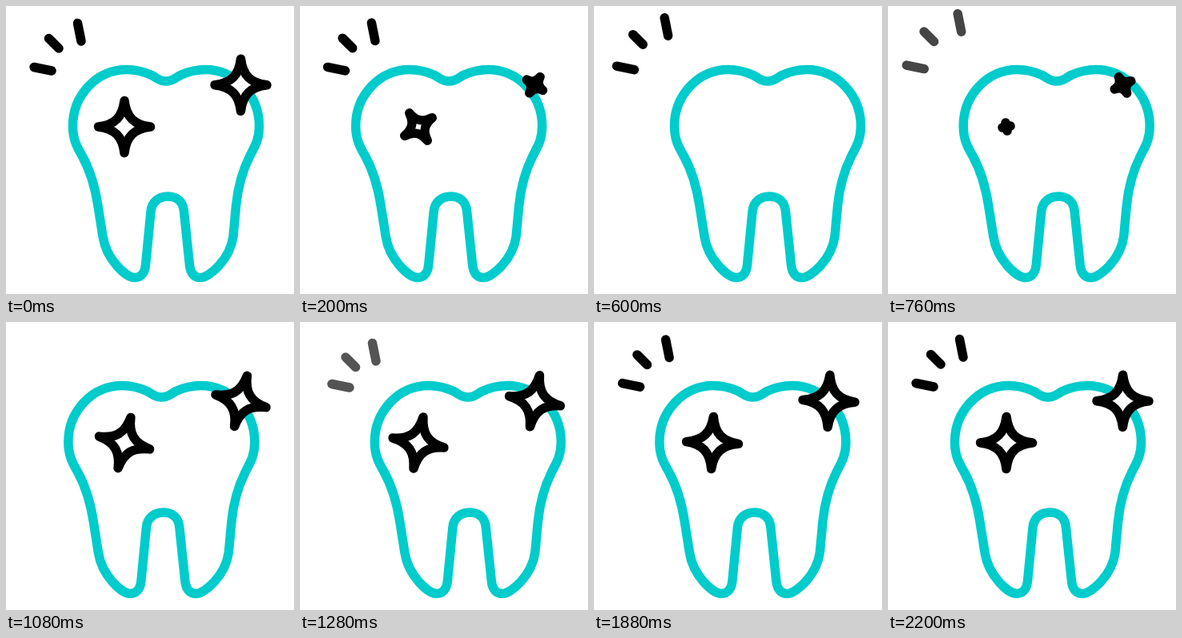
Write an HTML page that moves like this. It is 360x360 px and loops after 2.24 s.

```html
<!DOCTYPE html>
<html lang="en">
<head>
<meta charset="utf-8">
<title>Sparkling tooth</title>
<style>
  html, body { margin: 0; width: 100%; height: 100%; overflow: hidden; background: #fff; }
  svg { display: block; width: 100vw; height: 100vh; }
</style>
</head>
<body>
<svg viewBox="0 0 360 360" fill="none" stroke="#000" stroke-width="11.500" stroke-linecap="round" stroke-linejoin="round">
  <path id="tooth" stroke="#00cccb" d="M200 94C192 94 188 89.5 182 86.500C172 82 162 79.5 151 79.5
    C113 79.5 83.5 112 83.5 150C83.5 166 88 175 95 187C105 205 111 224 115 250L121 288
    C125.500 317 150 339.5 161 339.5C168.500 339.5 173.500 334 174.500 324L181 257
    C182 245 191 238 202.500 238C214 238 221.500 245 222.500 257L229.500 324
    C230.500 334 235 339.5 243 339.5C254 339.5 280 317 284 288L287.500 250
    C290 224 296 205 305 187C312 174 316.500 166 316.500 150C316.500 112 287 79.5 249 79.5
    C238 79.5 228 82 218 86.500C212 89.5 208 94 200 94Z"/>
  <g id="rays"></g>
  <g id="stars" fill="#fff"></g>
</svg>
<script>
const LOOP = 2240, STEP = 40;
const $ = id => document.getElementById(id);
const clamp = x => Math.max(0, Math.min(1, x));
const span = (t, a, b) => clamp((t - a) / (b - a));
const smooth = p => p * p * (3 - 2 * p);
const swing = p => (1 - Math.cos(Math.PI * p)) / 2;

function addPath(parent) {
  const path = document.createElementNS("http://www.w3.org/2000/svg", "path");
  return $(parent).appendChild(path);
}

// Outer and inner end of each ray
const rays = [[35, 76.5, 57, 81], [53.5, 40.5, 66, 53], [89.5, 21.5, 94, 44]].map(([x, y, x2, y2]) => {
  const el = addPath("rays"), len = Math.hypot(x2 - x, y2 - y);
  el.setAttribute("d", `M${x} ${y}L${x2} ${y2}`);
  return { el, dx: (x - x2) / len, dy: (y - y2) / len };
});

const stars = [{ x: 148, y: 151, delay: 60 }, { x: 293.5, y: 98.8, delay: 0 }]
  .map(star => ({ ...star, el: addPath("stars") }));

// Time and sideways offset at each turning point
const sway = [[0, 0], [320, -20], [660, 20], [950, -15], [1260, 10], [1560, -3], [LOOP, 0]];

function swayAt(t) {
  const i = sway.findIndex(([time]) => time > t);
  const [t0, x0] = sway[i - 1], [t1, x1] = sway[i];
  return x0 + (x1 - x0) * swing(span(t, t0, t1));
}

function drawRays(t) {
  const leaving = t < 1120;
  const shift = leaving
    ? 12 * (t / 760) ** 2.4
    : -7 * ((LOOP - t) / 1120) ** 2.2;
  const opacity = leaving ? 1 - span(t, 640, 1080) : span(t, 1120, 1360);
  $("rays").setAttribute("opacity", opacity);
  for (const { el, dx, dy } of rays)
    el.setAttribute("transform", `translate(${dx * shift} ${dy * shift})`);
}

// The outline keeps its weight while the shape scales
function starPath(scale) {
  const p = (...v) => v.map(n => (n * scale).toFixed(2)).join(" ");
  return `M${p(0, -32.5)}C${p(2.5, -12, 12, -2.5, 32.5, 0)}C${p(12, 2.5, 2.5, 12, 0, 32.5)}` +
    `C${p(-2.5, 12, -12, 2.5, -32.5, 0)}C${p(-12, -2.5, -2.5, -12, 0, -32.5)}Z`;
}

function drawStar({ el, x, y, delay }, t) {
  const growing = t > 500;
  const scale = growing
    ? smooth(span(t, 600 + delay, 1000 + delay))
    : 1 - smooth(span(t, delay, 340 + delay));
  const rest = 14 * (1 - span(t, 1080, LOOP)) ** 1.5;
  const angle = growing ? 90 * (1 - scale) + rest * scale : -90 * (1 - scale);
  el.setAttribute("visibility", scale > 0 ? "visible" : "hidden");
  el.setAttribute("d", starPath(scale));
  el.setAttribute("transform", `translate(${x} ${y}) rotate(${angle})`);
}

function draw(t) {
  $("tooth").setAttribute("transform", `translate(${swayAt(t)} 0)`);
  drawRays(t);
  stars.forEach(star => drawStar(star, t));
}

const start = performance.now();
function tick() {
  const t = (performance.now() - start) % LOOP;
  draw(Math.floor(t / STEP) * STEP);
  requestAnimationFrame(tick);
}
tick();
</script>
</body>
</html>
```
